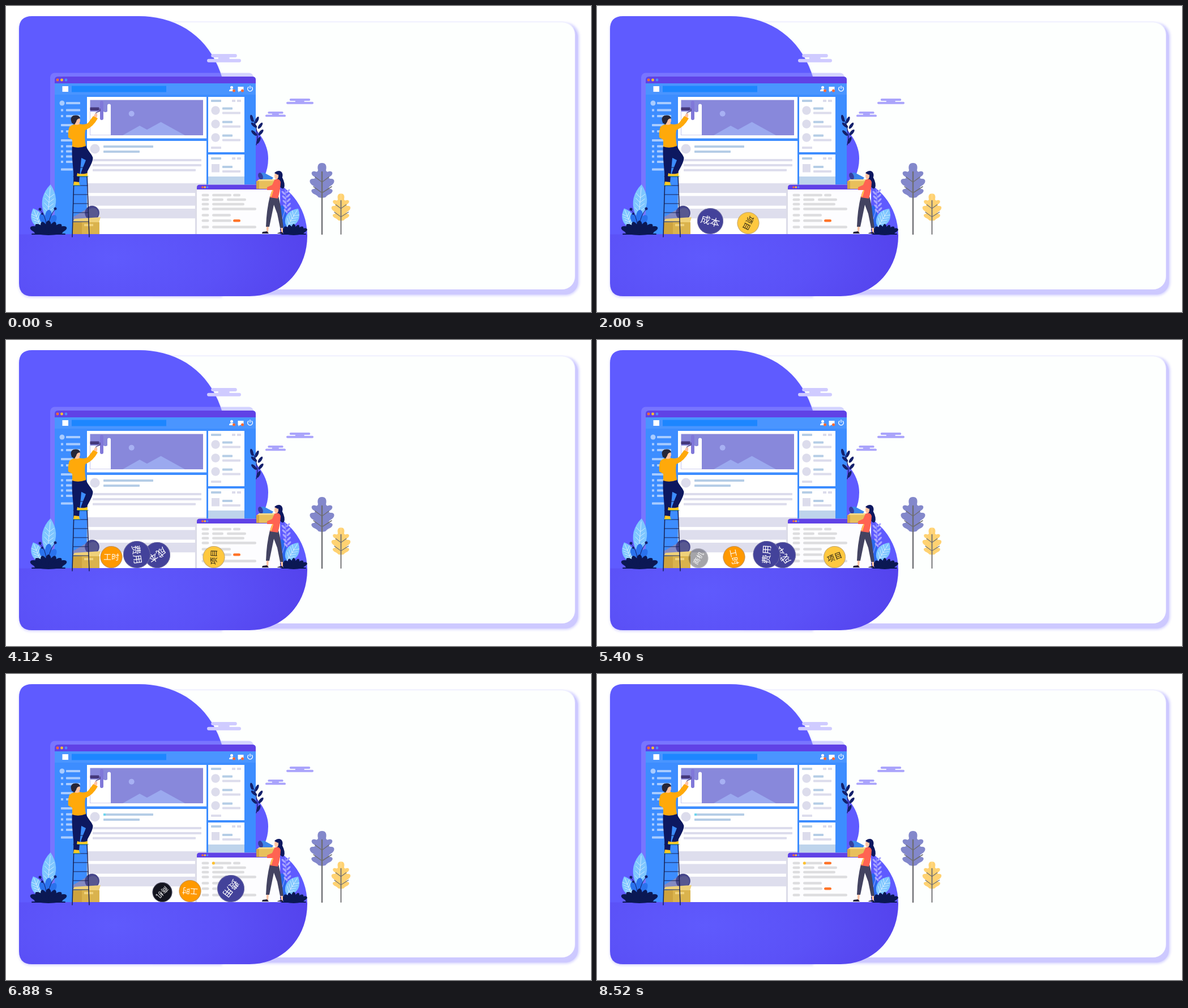
Write an HTML page that moves like this. It is 1033x542 px and loops after 8560 ms.

```html
<!DOCTYPE html>
<html lang="zh">
<head>
<meta charset="utf-8">
<style>
html, body { margin: 0; width: 100%; height: 100%; overflow: hidden; background: #fff; }
svg { display: block; width: 100vw; height: 100vh; }
text { font-family: "Noto Sans CJK SC", "Noto Sans CJK", sans-serif; text-anchor: middle; }
</style>
</head>
<body>
<svg id="stage" viewBox="0 0 1033 542" xmlns="http://www.w3.org/2000/svg">
  <defs>
    <filter id="soft" x="-5%" y="-5%" width="110%" height="110%"><feGaussianBlur stdDeviation="2"/></filter>
    <radialGradient id="soil" gradientUnits="userSpaceOnUse" cx="190" cy="445" r="350" gradientTransform="translate(0 245) scale(1 .45)">
      <stop offset="0" stop-color="#5f5afd"/><stop offset=".55" stop-color="#5b51f7"/><stop offset="1" stop-color="#5443ed"/>
    </radialGradient>
    <clipPath id="blobClip"><path d="M46 18H235C310 18 363 62 382 128L420 215H438C454 233 463 250 463 270Q463 288 456 302C502 319 532 358 532 407C532 468 489 514 430 514H46Q23 514 23 491V41Q23 18 46 18Z"/></clipPath>
  </defs>
  <g id="back"></g>
  <g id="window"></g>
  <g id="front"></g>
  <g id="balls"></g>
  <g id="people"></g>
</svg>
<script>
const LOOP = 8560, STEP = 40, FLOOR = 404;
const $ = id => document.getElementById(id);
const rect = (x, y, x2, y2, fill, r = 0, more = '') =>
  `<rect x="${x}" y="${y}" width="${x2 - x}" height="${y2 - y}" rx="${r}" fill="${fill}" ${more}/>`;
const dot = (x, y, r, fill) => `<circle cx="${x}" cy="${y}" r="${r}" fill="${fill}"/>`;
const path = (d, fill, more = '') => `<path d="${d}" fill="${fill}" ${more}/>`;
const line = (d, color, w = 1) =>
  `<path d="${d}" fill="none" stroke="${color}" stroke-width="${w}" stroke-linecap="round" stroke-linejoin="round"/>`;
const ellipse = (x, y, rx, ry, turn, fill) =>
  `<ellipse rx="${rx}" ry="${ry}" fill="${fill}" transform="translate(${x} ${y}) rotate(${turn})"/>`;
const bar = (x, x2, y, fill, h = 4) => rect(x, y, x2, y + h, fill, .8);
const pill = (x, x2, y, fill = '#dddddf') => rect(x, y - 2.3, x2, y + 2.3, fill, 2.3);

function cloud(x, y, w, fill, h = 4) {
  return rect(x + w * .12, y, x + w * .88, y + h, fill, h / 2) +
    rect(x + w * .33, y + h - 1, x + w * .66, y + h * 1.5 + 1, fill) +
    rect(x, y + h * 1.45, x + w, y + h * 2.45, fill, h / 2);
}

// A lobed leaf on a stalk, drawn around its own centre.
function tree(x, y, k, fill, foot) {
  const half = 'C6 -33 9 -29 7 -20Q8 -16 12 -18C19 -20 21 -13 14 -9Q10 -6 15 -5C23 -6 24 2 16 7Q9 11 14 13C21 13 20 20 12 23Q8 25 6 28L0 29';
  const g = s => `<g transform="scale(${s} 1)">${path('M0 -33' + half + 'Z', fill)}</g>`;
  return `<g transform="translate(${x} ${y}) scale(${k})">${g(1)}${g(-1)}</g>` +
    line(`M${x} ${y - 17 * k}V${foot}`, '#6e6e72', 2.4 * k) +
    line(`M${x - 12 * k} ${y - 8 * k}L${x} ${y + 1 * k}L${x + 12 * k} ${y - 8 * k}M${x - 15 * k} ${y + 9 * k}L${x} ${y + 20 * k}L${x + 17 * k} ${y + 9 * k}`, '#6e6e72', 1.5 * k);
}

function bush(x, w, h) {
  let s = ellipse(x, FLOOR - 3, w * .42, 5, 0, '#0b1854');
  for (let i = -3; i <= 3; i++)
    s += ellipse(x + i * w * .115, FLOOR - h * (.5 - Math.abs(i) * .06), w * .09, h * .5, i * 24, '#0b1854');
  return s + rect(x - w / 2, FLOOR - 1, x + w / 2, FLOOR + 1, '#0b1854', 1);
}

function veinLeaf(x, y, rx, ry, turn) {
  let v = `M0 ${-ry * .8}V${ry}`;
  for (let i = -1; i < 3; i++) {
    const b = i * ry * .28;
    v += `M${-rx * .6} ${b - 5}L0 ${b + 2}L${rx * .6} ${b - 5}`;
  }
  return `<g transform="translate(${x} ${y}) rotate(${turn})">` +
    path(`M0 ${-ry}Q${rx * 1.5} ${-ry * .2} ${rx * .6} ${ry * .7}Q0 ${ry * 1.2} ${-rx * .6} ${ry * .7}Q${-rx * 1.5} ${-ry * .2} 0 ${-ry}Z`, '#7ec6ff') +
    line(v, '#d2ecff', .9) + '</g>';
}

function backdrop() {
  return rect(240, 30, 1012, 513, '#d4d1ff', 24, 'filter="url(#soft)"') +
    rect(240, 34, 1010, 511, '#cdc9ff', 22) +
    rect(240, 27.5, 1005, 502, '#eeeeff', 23) +
    rect(240, 29, 1004, 502, '#fdfffe', 22) +
    path('M46 18H235C310 18 363 62 382 128V514H46Q23 514 23 491V41Q23 18 46 18Z', '#c9c5ff', 'filter="url(#soft)" transform="translate(0 2)" opacity=".8"') +
    '<g clip-path="url(#blobClip)">' + rect(20, 15, 540, 405, '#5f5bff') + rect(20, 404.5, 540, 518, 'url(#soil)') + '</g>' +
    cloud(355, 85, 60, '#cfcbff', 6) + cloud(495, 164, 48, '#aaa4fb') + cloud(458, 187, 36, '#aaa4fb', 3.8) +
    '<g clip-path="url(#blobClip)">' + rect(330, 80, 383, 125, '#5f5bff', 0, 'clip-path="path(\'M330 80H365Q375 102 381 125H330Z\')"') + '</g>' +
    tree(558, 311, 1, '#8388cb', 404) + tree(591.5, 358, .78, '#ffd272', 404);
}

function mainWindow() {
  const pale = '#a9ccff', lav = '#dcdcec', sky = '#b5cde6';
  let s = rect(78, 118.5, 437, 404, '#9b98ff', 8, 'opacity=".42"') +
    path('M86 404V131Q86 125 92 125H435Q441 125 441 131V404Z', '#3d8dff') +
    path('M86 137V131Q86 125 92 125H435Q441 125 441 131V137Z', '#6042e6') +
    dot(91, 131, 2.4, '#ff6a35') + dot(98.5, 131, 2.4, '#ffc12f') + dot(106, 131, 2.4, '#4b8dff') +
    rect(86, 137, 441, 157, '#4a95ff') + rect(116, 141.5, 283, 152.5, '#1d86ff') +
    rect(99.5, 142, 110, 152, '#fff') +
    dot(398.5, 144.3, 2.5, '#fff') + path('M394 151Q394 147 398.5 147T403 151Z', '#fff') + dot(402.5, 150, 2.5, '#ff6a35') +
    path('M409.5 143H419.5V150.5H413L410.5 153V150.5H409.5Z', '#fff') + dot(417.5, 150, 2.5, '#ff6a35') +
    line('M428.2 143.4A4.3 4.3 0 1 0 433.8 143.4M431 141.6V146', '#fff', 1.3);

  s += dot(99, 172, 4.5, pale) + bar(106, 131, 170, pale);
  for (const y of [184.5, 195, 222, 248.5, 257.5, 266.5, 276])
    s += rect(97, y - 2, 101, y + 2, pale) + bar(106, 131, y - 2, pale);
  for (const y of [211, 238, 289.5]) s += bar(97, 118, y - 2, pale);

  // banner being painted
  s += rect(143, 161, 354, 234.5, '#fff') + rect(148.5, 166.5, 348, 229, '#8888db') +
    path('M206 229L236 212L249 219L273.5 205.5L316 229Z', '#9ba9ef') + dot(221.7, 190.8, 5, '#a7b0f3') +
    rect(149, 187, 185, 228.6, '#fff') + rect(179, 173.5, 185, 205, '#fff', 3) +
    rect(166, 168, 172, 202, '#8078d9', 3) + rect(172, 168, 179, 188, '#8888db', 3);

  s += rect(143, 239, 354, 404, '#fff') + dot(157, 253, 8.5, lav) +
    bar(172, 260, 247, sky) + bar(172, 236, 256, sky) +
    bar(153, 345, 271, lav) + bar(153, 345, 280, lav) + bar(153, 335, 288.8, lav);
  for (const y of [314, 336.5, 359]) s += rect(143, y, 354, y + 17.2, '#dedeed');

  for (const [y, h] of [[161, 98], [263, 55]])
    s += rect(357, y, 421, y + h, '#fff') + bar(362, 380, y + 5, sky) +
      rect(399, y + 5, 405, y + 9, lav) + rect(408, y + 5, 415, y + 9, lav);
  for (const y of [185, 209, 233, 288.5]) {
    s += y < 280 ? dot(370, y, 7.7, lav) : rect(363, 280, 377, 294.5, lav);
    s += bar(382, 400, y - 5.5, sky) + bar(382, 414, y + 2.4, lav);
  }
  s += bar(362, 380, 249, lav) + rect(357, 302, 421, 318, '#bed4ec');

  // small window
  s += rect(334, 318, 338, 404, '#dcdce8') +
    path('M337 404V321Q337 316.5 342 316.5H479Q484 316.5 484 321V404Z', '#fdfdff') +
    path('M337 325V321Q337 316.5 342 316.5H479Q484 316.5 484 321V325Z', '#6042e6') +
    dot(347, 321, 1.8, '#ff6a35') + dot(351.3, 321, 1.8, '#ffc12f') + dot(355.6, 321, 1.8, '#4b8dff');
  const rows = [[335, 364, 398, 401, 414], [343, 364, 384, 390, 424], [351, 364, 421], [359.5, 364, 442], [370.5, 364, 397], [380.3, 364, 398], [391.5, 364, 442]];
  for (const [y, a, b, c, d] of rows)
    s += pill(345.5, 358.5, y) + pill(a, b, y) + (c ? pill(c, d, y) : '');
  return s + pill(401, 414, 380.3, '#ff7429') +
    `<g id="markA">${dot(366.3, 335, 2.6, '#ffc12f')}${rect(172, 247, 176, 251, '#6fd6ee')}</g>` +
    `<g id="markB">${pill(401, 414, 335, '#ff7429')}</g>`;
}

function foreground() {
  const navy = '#13206b';
  let s = veinLeaf(76, 346, 13, 30, 5) + veinLeaf(55, 376, 11, 19, -22);
  for (const [x, y, a] of [[66, 378, -25], [75, 372, 5], [82, 380, 30], [70, 386, 0]]) s += ellipse(x, y, 6, 11, a, '#2a72ed');
  s += line('M72 392Q70 370 60 361M74 390Q78 368 87 360', navy, 1) + dot(60, 360, 2.5, navy) + dot(87, 359, 2.5, navy) + dot(64, 368, 2, navy) +
    bush(75, 60, 24);

  s += line('M442 246Q448 224 434 196', navy, 1.3);
  for (const [x, y, a] of [[434, 199, -15], [443, 202, 25], [438, 211, -50], [449, 212, 35], [438, 225, -45], [450, 224, 40], [446, 238, 25]])
    s += ellipse(x, y, 2.6, 6.5, a, navy);
  s += ellipse(489, 377, 7, 24, -5, '#2a68ee') + veinLeaf(506, 375, 12, 19, 32) + line('M487 380Q498 352 493 325', '#a8a5ff', 1);
  for (let i = 0; i < 5; i++)
    s += ellipse(490 + i, 331 + i * 8, 1.7, 4.5, -45, '#a8a5ff') + ellipse(498 + i * .5, 328 + i * 8, 1.7, 4.5, 45, '#a8a5ff');
  s += bush(508, 44, 18);

  s += path('M118 374L147 357L156 380H118Z', '#8989bd', 'opacity=".92"') + dot(152, 366.5, 12.8, '#45458a') + dot(153.5, 367, 9.5, '#585890') +
    path('M118 382L121 377L167 374L164 384Z', '#efd17a') + rect(118, 383, 165, 404, '#dab34d') + rect(118, 383, 134, 404, '#cda33f') + rect(138, 386, 154, 390, '#f0d27c');
  return s + line('M121 268L117 409M142 268L147 409', '#172052', 1.5) +
    [286, 302, 318, 334, 350, 366, 382].map(y => line(`M119 ${y}H${143 + (y - 286) * .035}`, '#172052', 1.1)).join('');
}

function people() {
  const skin = '#ffc3a4', navy = '#0d1860', coral = '#ff6352';
  const man = path('M117 246H141C143 256 152 262 153.5 269C153 279 145 289 141 299L132 297C135 287 139 279 141 273L133 269C132 284 130 298 129 313L120 312C120 290 115 270 117 246Z', navy) +
    path('M126 296Q132 299 144 296L144 301H125Z', '#ffc823') + path('M120 311L129 312L130 317H119Z', '#ffc823') +
    line('M126 301.5H145M119 317.5H131', '#55a86a', 1.2) +
    line('M158 194L159 189L166 186V182', '#43366f', 1.2) + rect(148.5, 179.5, 164.5, 185, '#44377a', 1) +
    ellipse(158, 195, 3, 5, 20, skin) +
    path('M112 214Q119 208 130 209Q140 211 145 207L154 195L162 199Q154 214 140 220Q138 232 141 248Q128 253 117 249L117 237L110 233Q109 222 112 214Z', '#ffa90a') +
    path('M120 204L129 200L130 209Q125 212 120 209Z', skin) + ellipse(126.5, 202.5, 4.5, 6, 0, skin) +
    path('M116 207Q112 197 119 194Q129 192 131 199Q125 199 124 205L121 210Z', '#272638');
  const woman = path('M449 310L445 300Q448 295 455 295L472 304L468 310Z', '#3d86ea') + ellipse(449.5, 301.5, 4, 6.5, -20, '#343f9d') +
    path('M442 311L447 307H478L475 312Z', '#f6d98a') + rect(442, 310, 477, 324, '#e8bf5b') + rect(442, 310, 447, 324, '#d2a546') +
    ellipse(485, 311, 5.5, 13, -20, navy) + ellipse(482, 300, 6.5, 8, 0, navy) + ellipse(477.5, 301, 3.6, 6, 0, skin) + path('M474 296Q478 290 485 294L480 299Z', navy) +
    path('M466 337H481Q485 352 487 371L490 393H484L479 368L473 352L465 391H459Q460 361 466 337Z', '#434361') +
    path('M460 391H464L463 401H460ZM485 393H489L489 402H486Z', skin) +
    path('M453 400L461 399L464 403H452ZM480 402L487 400L490 403H479Z', '#242139') +
    line('M463 323L473 320', skin, 4) + path('M474 308Q483 304 485 312Q484 329 480 341L466 339Q468 328 471 326L461 326L461 321L470 317Z', coral) + line('M471 327L468 337', '#ffd04f', 2);
  return man + woman;
}

// keys: time, x, angle, radius, opacity
const balls = [
  { text: '项目', fill: '#ffc83f', ink: '#2a2415', size: 13.5, keys: [
    [80, 166, -14, 16, 0], [560, 190, 18, 19.5, 1], [2000, 267, 117, 19.5, 1], [3240, 330.5, 201, 19.5, 1],
    [4120, 367, 272, 19.5, 1], [5400, 419.5, 340, 19.5, 1], [5660, 431, 354, 19.5, 1], [5860, 437, 364, 19.5, 0]] },
  { text: '成本', fill: '#43429a', ink: '#fff', size: 17, keys: [
    [1000, 168, -45, 19, 0], [1440, 182, -18, 23, 1], [2000, 200, 15, 23, 1], [3240, 239.5, 92, 23, 1],
    [4120, 267, 145, 23, 1], [5400, 328, 235, 23, 1], [6480, 418, 330, 23, 1], [6720, 433, 350, 23, 0]] },
  { text: '费用', fill: '#43429a', ink: '#fff', size: 17, keys: [
    [2960, 168, -52, 19, 0], [3240, 182.5, -23, 20, .65], [3560, 200, 14, 23, 1], [4120, 231, 82, 24, 1],
    [5400, 299.5, 273, 24, 1], [6880, 397, 488, 24, 1], [7160, 413, 524, 24, 1], [7360, 420, 545, 24, 0]] },
  { text: '工时', fill: '#ff9900', ink: '#fff', size: 14, keys: [
    [3640, 166, -32, 17, 0], [4040, 182.5, -4, 19.5, 1], [4120, 186, 1, 19.5, 1], [5400, 242, 78, 19.5, 1],
    [6880, 325, 184, 19.5, 1], [7720, 387, 244, 19.5, 1], [8080, 412, 270, 19.5, 0]] },
  { text: '商机', fill: '#14151f', ink: '#fff', size: 12, keys: [
    [5200, 167, -85, 17, 0], [5400, 179, -60, 17.5, .38], [5720, 199, -18, 17.5, 1],
    [6880, 276, 135, 17.5, 1], [8160, 382, 310, 17.5, 1], [8480, 410, 355, 17.5, 0]] }
];

function pose(keys, t) {
  const i = keys.findIndex(k => k[0] > t);
  if (i < 1) return null;
  const a = keys[i - 1], b = keys[i], p = (t - a[0]) / (b[0] - a[0]);
  return a.map((v, n) => v + (b[n] - v) * p);
}

$('back').innerHTML = backdrop();
$('window').innerHTML = mainWindow();
$('front').innerHTML = foreground();
$('people').innerHTML = people();
$('balls').innerHTML = balls.map(b => {
  const r = b.keys[3][3];
  return `<g>${dot(0, 0, r, b.fill)}<circle r="${r - .5}" fill="none" stroke="#8c8aa8" stroke-opacity=".55"/>` +
    `<text y="${b.size * .36}" font-size="${b.size}" font-weight="500" fill="${b.ink}">${b.text}</text></g>`;
}).join('');
balls.forEach((b, i) => { b.el = $('balls').children[i]; });

function draw(now) {
  const t = Math.floor(now % LOOP / STEP) * STEP;
  for (const b of balls) {
    const p = pose(b.keys, t);
    b.el.style.display = p ? '' : 'none';
    if (!p) continue;
    const [, x, angle, r, alpha] = p;
    b.el.setAttribute('transform', `translate(${x} ${FLOOR - r}) rotate(${angle}) scale(${r / b.keys[3][3]})`);
    b.el.setAttribute('opacity', alpha);
  }
  $('markA').style.display = t >= 5880 ? '' : 'none';
  $('markB').style.display = t >= 8000 ? '' : 'none';
}

let start;
function tick(now) {
  start ??= now;
  draw(now - start);
  requestAnimationFrame(tick);
}
draw(0);
requestAnimationFrame(tick);
</script>
</body>
</html>
```
